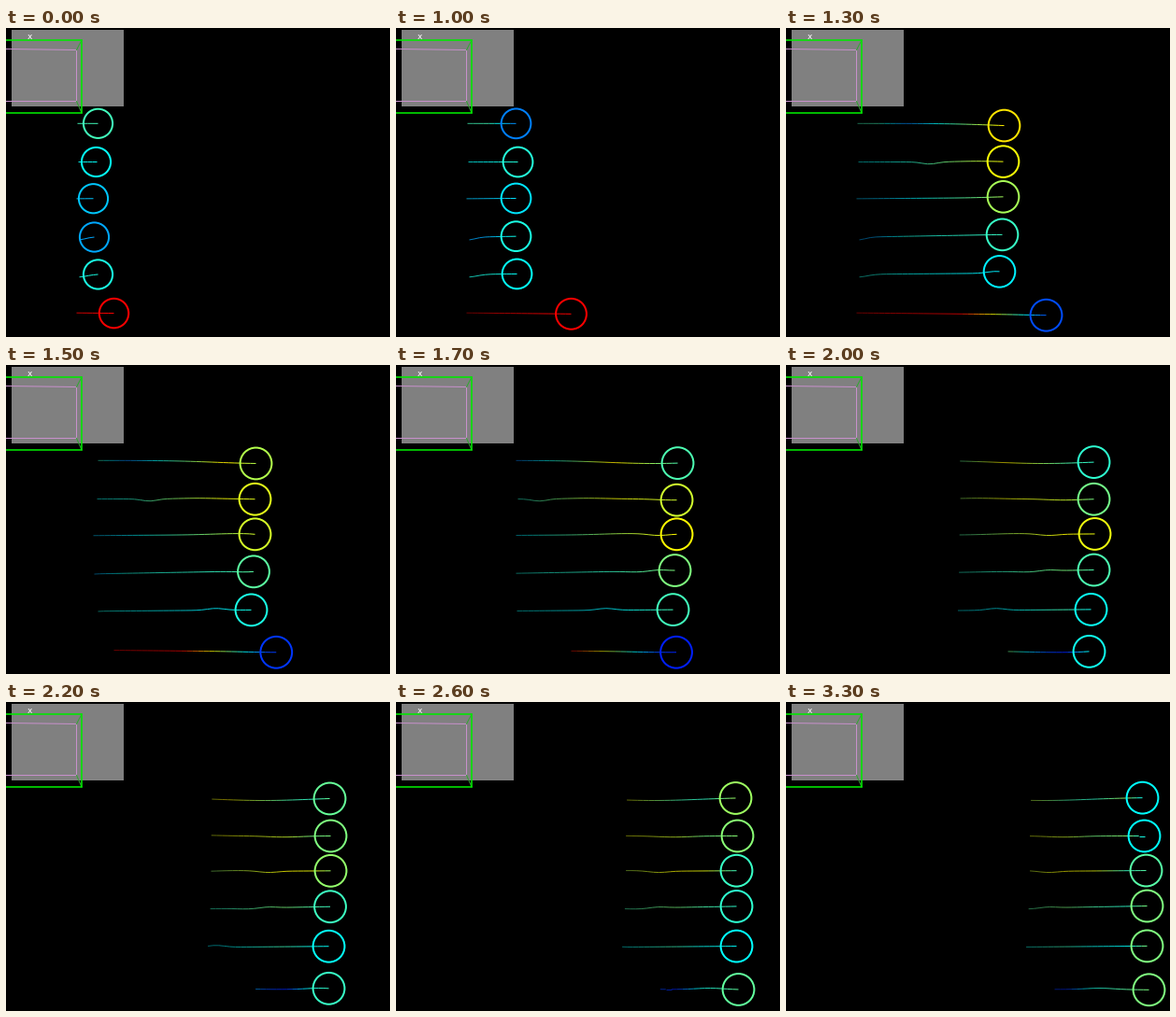
Write a matplotlib script that moves like this. It is 411 px wide and 331 px high and loops after 4.3 s.

```python
import numpy as np
import matplotlib.pyplot as plt
from matplotlib.animation import FuncAnimation
from matplotlib.collections import LineCollection
from matplotlib.patches import Circle, Rectangle

W, H, DPI = 411, 331, 64
PX = 72 / DPI  # one pixel in points

# Ticks (100 ms each) at which the picture changes, and the steps that hit a key pose
TICKS = [0, *range(10, 23), 24, 26, 33]
KEY_STEPS = [0, 1, 4, 8, 11, 15, 16]


def jet(v):
    v = np.asarray(v)[..., None]
    return np.clip(1.5 - np.abs(4 * v - np.array([3, 2, 1])), 0, 1)


def progress(step):
    """Position of the head along the key poses; pose 0 is where the trail begins."""
    return np.interp(step, KEY_STEPS, range(1, 8))


def tail_progress(step):
    """The tail waits, then follows the same poses with a growing lag."""
    return np.interp(progress(step), [3.25, 3.5, 4, 5, 6, 7], [0, 1, 2, 2.55, 3.2, 3.42])


class Row:
    """A ring moving along a gently bumpy line, leaving a heat-coloured trail."""

    def __init__(self, y, slope, bumps, heads, heat):
        self.y, self.slope, self.bumps = y, slope, bumps
        self.heads, self.heat = heads, [heat[0], *heat]

    def height(self, x):
        y = self.y + self.slope * (x - 98)
        for size, mid, width in self.bumps:
            y = y + size * np.exp(-((x - mid) / width) ** 2 / 2)
        return y

    def at(self, p):
        return np.interp(p, range(8), self.heads)

    def heat_at(self, x):
        return np.interp(x, self.heads, self.heat)

    def trail(self, step):
        tail, head = self.at(tail_progress(step)), self.at(progress(step))
        xs = np.linspace(tail, head, int((head - tail) / 6) + 2)
        pts = np.column_stack([xs, self.height(xs)]) + 0.5
        mids = (xs[:-1] + xs[1:]) / 2
        fade = 1 - 0.6 * (head - mids) / max(head - tail, 110)
        colors = jet(self.heat_at(mids)) * fade[:, None]
        return list(zip(pts[:-1], pts[1:])), list(colors)


ROWS = [
    Row(101.8, 0, [(3.2, 275, 50)],
        [76, 98, 128, 233, 301, 329, 363, 381],
        [.44, .25, .65, .45, .42, .53, .375]),
    Row(143, 0, [(2.3, 153, 8), (-.8, 205, 22), (1.2, 297, 18)],
        [76, 96, 130, 232, 300, 329, 365, 383],
        [.38, .41, .62, .58, .49, .51, .375]),
    Row(182.2, -.0075, [(-1, 245, 25), (1.6, 280, 10)],
        [75, 93, 128, 232, 300, 330, 364, 385],
        [.32, .35, .54, .63, .61, .43, .46]),
    Row(223.2, -.018, [(3, 76, 8), (.9, 258, 12), (-1, 280, 8)],
        [78, 94, 128, 231, 298, 329, 364, 386],
        [.29, .4, .43, .5, .45, .42, .5]),
    Row(263.2, -.008, [(3, 76, 10), (-2, 224, 9)],
        [78, 98, 129, 228, 296, 326, 364, 386],
        [.4, .38, .36, .44, .385, .375, .5]),
    Row(304.9, .01, [(.5, 280, 25), (-1.3, 336, 14)],
        [75, 115, 187, 278, 299.5, 324, 366, 388],
        [.875, .875, .2, .155, .39, .47, .5]),
]

fig = plt.figure(figsize=(W / DPI, H / DPI), dpi=DPI, facecolor="black")
ax = fig.add_axes([0, 0, 1, 1])
ax.set_xlim(0, W)
ax.set_ylim(H, 0)
ax.axis("off")

# Static panel with the wireframe box: back face, depth edges, front face
ax.add_patch(Rectangle((6, 2), 120, 82, color="#808080", lw=0))
ax.plot([0, 75.5, 75.5, 0], [22.5, 23.5, 78.5, 78.5], color="#c890cc", lw=PX)
for y0, y1 in [(23.5, 13), (78.5, 91)]:
    ax.plot([75.5, 81], [y0, y1], color="#30a830", lw=PX)
ax.plot([-2, 81, 81, -2], [13, 13, 91, 91], color="#00e800", lw=1.6 * PX,
        solid_joinstyle="miter")
ax.text(25, 12, "x", color="white", size=9 * PX, family="DejaVu Sans",
        ha="center", va="baseline")

trails = LineCollection([], linewidths=PX, zorder=3)
ax.add_collection(trails)
rings = [ax.add_patch(Circle((0, 0), 16, fill=False, lw=2 * PX, zorder=4)) for _ in ROWS]


def draw(tick):
    step = np.searchsorted(TICKS, tick, side="right") - 1
    segments, colors = [], []
    for row, ring in zip(ROWS, rings):
        x = row.at(progress(step))
        ring.center = x + 0.5, row.height(x) + 0.5
        ring.set_radius(np.interp(x, [100, 240], [15.6, 16.9]))
        ring.set_edgecolor(jet(row.heat_at(x)))
        segs, cols = row.trail(step)
        segments += segs
        colors += cols
    trails.set_segments(segments)
    trails.set_color(colors)
    return [trails, *rings]


anim = FuncAnimation(fig, draw, frames=43, interval=100, repeat=True,
                     repeat_delay=0, blit=False)
plt.show()
```
